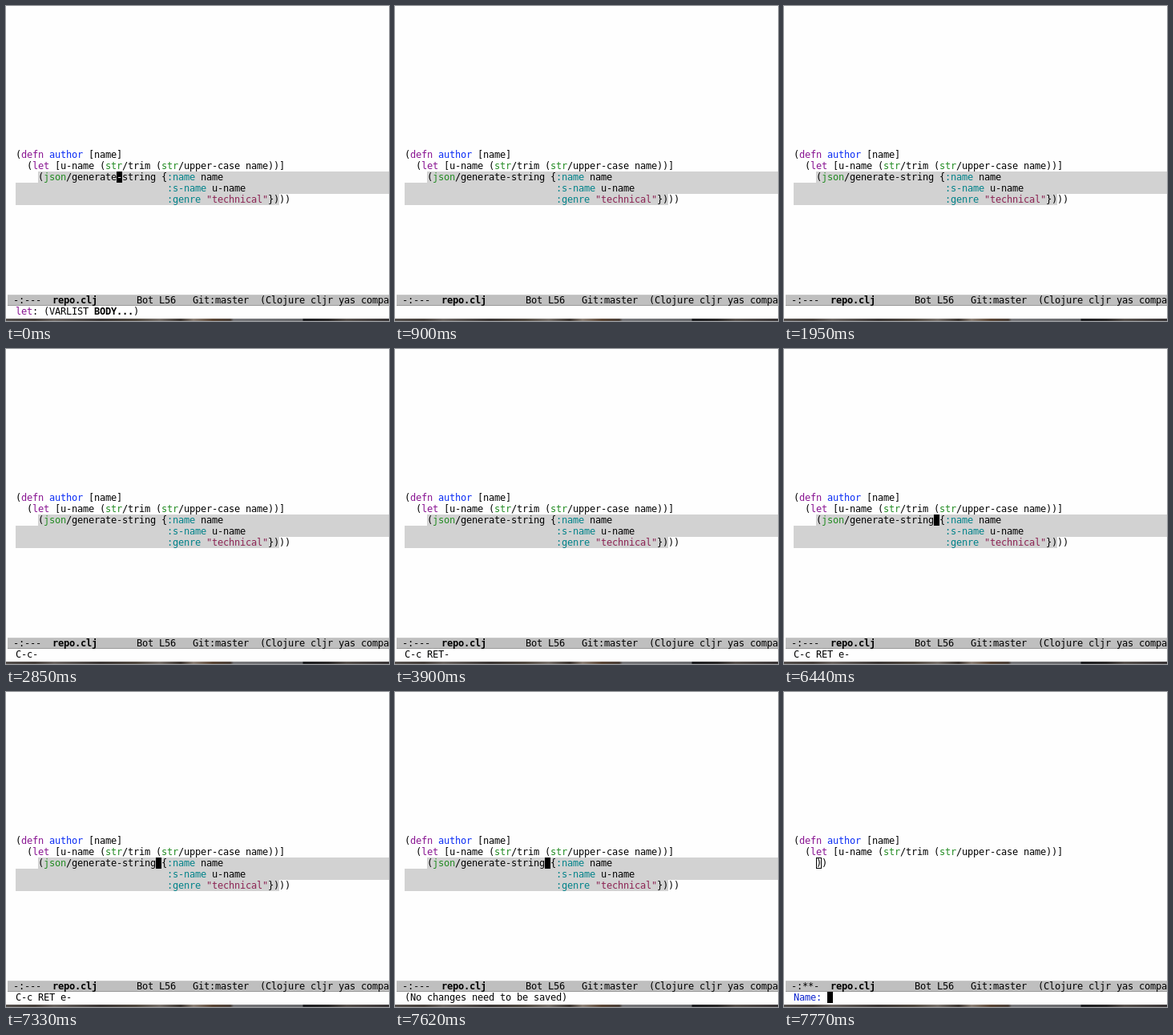
Animation of 478 by 394 pixels, one loop 8 s. Source, as an HTML page:

```html
<!DOCTYPE html>
<html lang="en">
<head>
<meta charset="utf-8">
<title>Clojure editing session</title>
<style>
  html, body { margin: 0; width: 100%; height: 100%; overflow: hidden; background: #fefefe; }
  body { position: relative; color: #000; }
  pre, div { position: absolute; box-sizing: border-box; }
  pre, .cursor {
    margin: 0;
    font: 12px/14px "DejaVu Sans Mono", monospace;
    letter-spacing: calc(7px - 1ch); /* snap to a 7px grid */
    white-space: pre;
  }
  #code { left: 12px; top: 179px; }
  #echo { left: 12px; top: 375px; height: 14px; }
  #mode {
    left: 2px; top: 361px; width: 476px; height: 14px; overflow: hidden;
    background: #bfbfbf; box-shadow: inset 0 1px #cacaca, inset 0 -1px #999;
  }
  .region { background: #d2d2d2; height: 14px; }
  .cursor { width: 7px; height: 14px; background: #000; color: #fff; }
  .hollow { background: none; border: 1px solid #000; }
  .k { color: #881391; }
  .f { color: #0a2cf5; }
  .t { color: #228b22; }
  .c { color: #008289; }
  .s { color: #8b2252; }
  .p { color: #0a22cd; }
  #desk {
    left: 0; top: 391px; width: 478px; height: 3px;
    background: linear-gradient(90deg, #55504d 0, #463f3a 36px, #6b6561 60px, #3b3634 118px,
      #50483f 162px, #77706a 192px, #3c3530 218px, #8b8076 234px, #5b4635 258px, #4b4039 280px,
      #77777a 284px, #68696c 370px, #1d1e21 371px, #292727 402px, #56504c 425px, #393536 478px);
  }
</style>
</head>
<body>
<div id="regions">
  <div class="region" style="left:40px;top:207px;width:438px"></div>
  <div class="region" style="left:12px;top:221px;width:466px"></div>
  <div class="region" style="left:12px;top:235px;width:329px"></div>
</div>
<pre id="code"></pre>
<pre id="mode"></pre>
<pre id="echo"></pre>
<div id="desk"></div>
<div id="cursor" class="cursor"></div>
<div id="point" class="cursor hollow" style="left:40px;top:207px"></div>
<script>
const LOOP = 8000, PROMPT = 7770;
const $ = id => document.getElementById(id);
const tag = (cls, text) => `<span class="${cls}">${text}</span>`;

const head = `(${tag('k', 'defn')} ${tag('f', 'author')} [name]
  (${tag('k', 'let')} [u-name (${tag('t', 'str')}/trim (${tag('t', 'str')}/upper-case name))]
    `;
const pad = ' '.repeat(27);
const form = `(${tag('t', 'json')}/generate-string {${tag('c', ':name')} name
${pad}${tag('c', ':s-name')} u-name
${pad}${tag('c', ':genre')} ${tag('s', '"technical"')}}`;

// [start ms, echo area content]
const echoes = [
  [0, `${tag('k', 'let')}: (VARLIST <b>BODY...</b>)`],
  [900, ''],
  [2850, 'C-c-'],
  [3450, 'C-c return'],
  [3600, 'C-c RET-'],
  [4800, 'C-c RET e-'],
  [7620, '(No changes need to be saved)'],
  [PROMPT, tag('p', 'Name:')]
];
// the cursor alternates off and on at these times
const blinks = [900, 1350, 1950, 2400, 2850, 3450, 3900, 4350, 4950, 5400, 5840, 6440, 6880, 7330];

function show(el, on) { el.style.visibility = on ? 'visible' : 'hidden'; }
function fill(el, html) {
  if (el.shown !== html) el.innerHTML = el.shown = html;
}

function draw(t) {
  const prompt = t >= PROMPT, start = t < 450;
  fill($('code'), head + (prompt ? '))' : form + ')))'));
  fill($('mode'), ` -:${prompt ? '**-' : '---'}  <b>repo.clj</b>       Bot L56   Git:master  (Clojure cljr yas company`);
  fill($('echo'), echoes.filter(e => e[0] <= t).pop()[1]);
  show($('regions'), !prompt);
  show($('point'), prompt);

  const cursor = $('cursor');
  const col = prompt ? 6 : start ? 18 : 25;
  cursor.style.left = 12 + col * 7 + 'px';
  cursor.style.top = (prompt ? 375 : 207) + 'px';
  fill(cursor, start ? '-' : '');
  show(cursor, blinks.filter(b => b <= t).length % 2 === 0);
}

const origin = performance.now();
function tick(now) {
  draw(Math.max(0, now - origin) % LOOP);
  requestAnimationFrame(tick);
}
draw(0);
requestAnimationFrame(tick);
</script>
</body>
</html>
```
